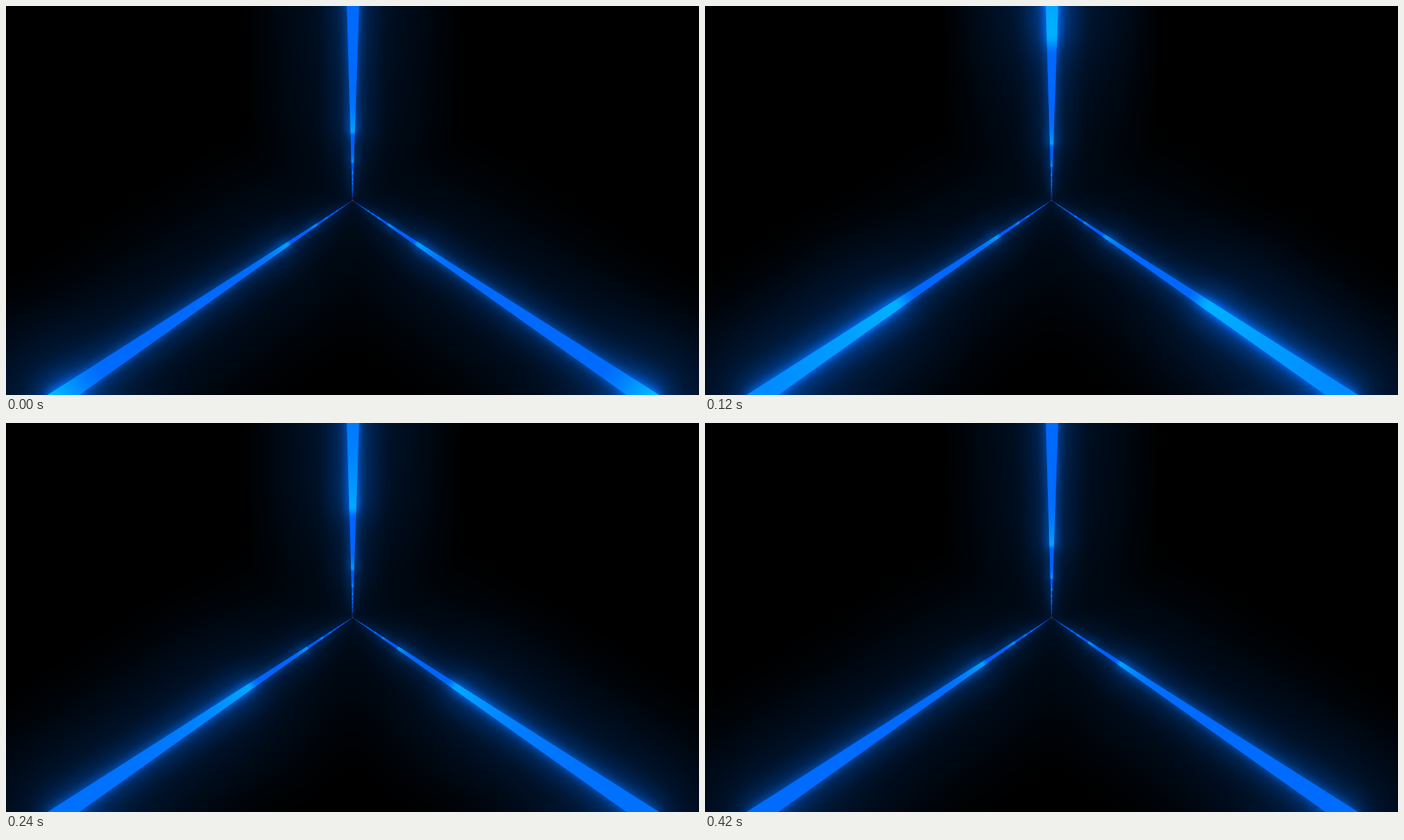
Write an HTML page with a canvas that moves like this. It is 800 px wide and 450 px high and loops after 0.45 s.

```html
<!DOCTYPE html>
<html lang="en">
<head>
<meta charset="utf-8">
<title>Light tunnel</title>
<style>
  html, body { margin: 0; width: 100%; height: 100%; overflow: hidden; background: #000; }
  canvas { display: block; width: 800px; height: 450px; }
</style>
</head>
<body>
<canvas id="stage" width="800" height="450"></canvas>
<script>
const W = 800, H = 450, HW = W / 2, HH = H / 2;
const LOOP = 450, STEP = 30;
const CX = 400, CY = 225;

// Depth is 1 / distance; pulses are one PERIOD of depth apart.
const NEAR = 0.0034, PERIOD = 0.0106;

// Two edge points per beam, and the on-screen length of one distance unit.
const BEAMS = [
  { a: [393.5, 0], b: [407.6, 0], unit: 1.06 },
  { a: [48, 450], b: [84.5, 450], unit: 1.206 },
  { a: [716.5, 450], b: [754, 450], unit: 1.206 }
];

// Bloom layers: sigma in half-size pixels, and gain.
const GLOWS = [[2, 0.4], [7, 0.27], [20, 0.15]];
const GLOW_GREEN = 0.16;
const MAX_POWER = 5;

const stage = document.getElementById('stage').getContext('2d');

function scratch(w, h) {
  const c = document.createElement('canvas');
  c.width = w;
  c.height = h;
  return c.getContext('2d', { willReadFrequently: true });
}
const core = scratch(W, H), half = scratch(HW, HH);
half.scale(0.5, 0.5);

const decode = Float32Array.from({ length: 256 }, (_, i) => (i / 255) ** 2.2);
// Indexed by the square root of linear light, for precision in the darks.
const encode = Uint8ClampedArray.from({ length: 4096 }, (_, i) => 255 * (i / 4095) ** (2 / 2.2));
const toByte = v => encode[Math.sqrt(Math.min(1, v)) * 4095 | 0];

function smooth(x) {
  x = Math.max(0, Math.min(1, x));
  return x * x * (3 - 2 * x);
}

// Green level of a beam at a distance from the vanishing point.
function green(dist, u) {
  const z = 1 / Math.max(dist, 2);
  const q = u - (z - NEAR) / PERIOD;
  const turn = Math.floor(q), age = q - turn;
  const life = (u - turn) * LOOP;
  const peak = 62 + 40 * Math.exp(-life / 70);
  const pulse = smooth(age / 0.07) * Math.exp(-((age / 0.32) ** 2));
  return 116 - 6 * age - 30 * Math.min(1, z / 0.03) + peak * pulse;
}

const coreColor = g => `rgb(0,${Math.round(g)},255)`;
const powerColor = g => `rgb(${Math.round(255 / MAX_POWER * (g / 110) ** 2.2)},0,0)`;

function drawBeams(ctx, u, color) {
  const stops = 140;
  ctx.clearRect(0, 0, W, H);
  for (const { a, b, unit } of BEAMS) {
    const dx = (a[0] + b[0]) / 2 - CX, dy = a[1] - CY;
    const len = Math.hypot(dx, dy) * 1.1;
    const fill = ctx.createLinearGradient(CX, CY, CX + dx * 1.1, CY + dy * 1.1);
    for (let i = 0; i <= stops; i++) {
      const p = (i / stops) ** 2;
      fill.addColorStop(p, color(green(p * len / unit, u)));
    }
    ctx.fillStyle = fill;
    ctx.beginPath();
    ctx.moveTo(CX, CY);
    for (const [x, y] of [a, b]) ctx.lineTo(CX + (x - CX) * 1.1, CY + (y - CY) * 1.1);
    ctx.fill();
  }
}

// Running mean along one axis, edges clamped.
function boxPass(src, dst, lines, lineStep, n, step, r) {
  const k = 1 / (2 * r + 1);
  for (let l = 0; l < lines; l++) {
    const at = l * lineStep, last = n - 1;
    let sum = src[at] * (r + 1);
    for (let i = 1; i <= r; i++) sum += src[at + Math.min(i, last) * step];
    for (let i = 0; i < n; i++) {
      dst[at + i * step] = sum * k;
      sum += src[at + Math.min(i + r + 1, last) * step] - src[at + Math.max(i - r, 0) * step];
    }
  }
}

function blur(src, sigma) {
  const r = Math.round((Math.sqrt(4 * sigma * sigma + 1) - 1) / 2);
  const out = Float32Array.from(src), tmp = new Float32Array(src.length);
  for (let i = 0; i < 3; i++) {
    boxPass(out, tmp, HH, HW, HW, 1, r);
    boxPass(tmp, out, HW, 1, HH, HW, r);
  }
  return out;
}

function bloom(u) {
  drawBeams(half, u, powerColor);
  const px = half.getImageData(0, 0, HW, HH).data;
  const power = new Float32Array(HW * HH), sum = new Float32Array(HW * HH);
  for (let i = 0; i < power.length; i++) {
    power[i] = px[4 * i] * px[4 * i + 3] / 65025 * MAX_POWER;
  }
  for (const [sigma, gain] of GLOWS) {
    const layer = blur(power, sigma);
    for (let i = 0; i < sum.length; i++) sum[i] += layer[i] * gain;
  }
  return sum;
}

function render(u) {
  const glow = bloom(u);
  drawBeams(core, u, coreColor);
  const image = core.getImageData(0, 0, W, H), px = image.data;
  for (let y = 0, i = 0; y < H; y++) {
    const sy = Math.max(0, Math.min(HH - 1, y / 2 - 0.25));
    const y0 = sy | 0, fy = sy - y0;
    const top = y0 * HW, low = Math.min(HH - 1, y0 + 1) * HW;
    for (let x = 0; x < W; x++, i += 4) {
      const sx = Math.max(0, Math.min(HW - 1, x / 2 - 0.25));
      const x0 = sx | 0, x1 = Math.min(HW - 1, x0 + 1), fx = sx - x0;
      const t = glow[top + x0] * (1 - fx) + glow[top + x1] * fx;
      const b = glow[low + x0] * (1 - fx) + glow[low + x1] * fx;
      const halo = t * (1 - fy) + b * fy;
      const cover = px[i + 3] / 255, rest = 1 - cover;
      px[i] = 0;
      px[i + 1] = toByte(decode[px[i + 1]] * cover + halo * GLOW_GREEN * rest);
      px[i + 2] = toByte(cover + Math.min(1, halo) * rest);
      px[i + 3] = 255;
    }
  }
  return image;
}

const count = LOOP / STEP;
const frames = Array.from({ length: count }, (_, i) => render(i / count));

function show(i) {
  stage.putImageData(frames[i], 0, 0);
  stage.fillStyle = 'rgb(62,42,30)';
  stage.fillRect(CX - 1, CY - 1, 2, 2);
}

let start = null, shown = 0;
function tick(now) {
  if (start === null) start = now;
  const i = Math.floor(((now - start) % LOOP) / STEP);
  if (i !== shown) show(shown = i);
  requestAnimationFrame(tick);
}
show(0);
requestAnimationFrame(tick);
</script>
</body>
</html>
```
